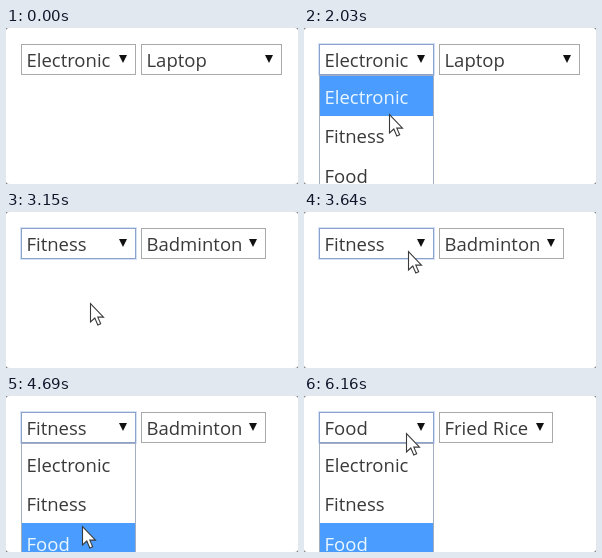
Write an HTML page with a canvas that moves like this. It is 292 by 156 pixels and loops after 6300 ms.

```html
<!DOCTYPE html>
<html lang="en">
<head>
<meta charset="utf-8">
<title>Linked dropdowns</title>
<style>
  html, body { margin: 0; width: 100%; height: 100%; overflow: hidden; background: #fff; }
  canvas { display: block; width: 292px; height: 156px; }
</style>
</head>
<body>
<canvas id="stage"></canvas>
<script>
const W = 292, H = 156, LOOP = 6300, TICK = 70;
const BOX_TOP = 16, BOX_HEIGHT = 31, BOX_WIDTH = 115, LIST_TOP = 48, ROW = 39.5;
const TEXT = '#3a3a3a', BORDER = '#a9a9a9', BLUE = '#4a9dff';

const choices = [
  { category: 'Electronic', product: 'Laptop', width: 141 },
  { category: 'Fitness', product: 'Badminton', width: 125 },
  { category: 'Food', product: 'Fried Rice', width: 114 }
];

const linear = k => k;
const easeOut = k => 1 - (1 - k) ** 2;
const easeInOut = k => k * k * (3 - 2 * k);

const entry = { x: 162, y: 140 };
const moves = [
  { from: 70, to: 210, x: 102, y: 36, ease: linear },
  { from: 1540, to: 2240, x: 78, y: 107, ease: linear },
  { from: 3080, to: 3640, x: 104, y: 39, ease: easeOut },
  { from: 4200, to: 4690, x: 76, y: 130, ease: easeInOut },
  { from: 5460, to: 5950, x: 102, y: 37, ease: easeInOut }
];
const opens = [1400, 3920, 6020];
const closes = [2660, 5040];

const canvas = document.getElementById('stage');
const ctx = canvas.getContext('2d');
const scale = window.devicePixelRatio || 1;
canvas.width = W * scale;
canvas.height = H * scale;

function pointerAt(t) {
  let { x, y } = entry;
  for (const move of moves) {
    const k = Math.min(Math.max((t - move.from) / (move.to - move.from), 0), 1);
    x += (move.x - x) * move.ease(k);
    y += (move.y - y) * move.ease(k);
  }
  return { x: Math.round(x), y: Math.round(y) };
}

// The list fades for one tick when it opens and when it closes.
function listOpacity(t) {
  const i = opens.findLastIndex(time => t >= time);
  const close = closes[i] ?? LOOP;
  if (i < 0 || t >= close + TICK) return 0;
  return t < opens[i] + TICK || t >= close ? 0.5 : 1;
}

function rect(x, y, w, h, color) {
  ctx.fillStyle = color;
  ctx.fillRect(x, y, w, h);
}

function outline(x, y, w, h, color) {
  ctx.strokeStyle = color;
  ctx.lineWidth = 1;
  ctx.strokeRect(x + 0.5, y + 0.5, w - 1, h - 1);
}

function label(text, x, baseline, color = TEXT) {
  ctx.fillStyle = color;
  ctx.fillText(text, x, baseline);
}

function polygon(points) {
  ctx.beginPath();
  points.forEach(([x, y]) => ctx.lineTo(x, y));
  ctx.closePath();
}

function drawSelect(x, width, text, focused) {
  if (focused) outline(x - 1, BOX_TOP - 1, width + 2, BOX_HEIGHT + 2, '#d5e1f5');
  outline(x, BOX_TOP, width, BOX_HEIGHT, focused ? '#8ba2cc' : BORDER);
  label(text, x + 5.5, 39);
  const middle = x + width - 13;
  polygon([[middle - 4, 27], [middle + 4, 27], [middle, 35]]);
  ctx.fillStyle = '#111';
  ctx.fill();
}

function drawList(active, opacity) {
  ctx.globalAlpha = opacity;
  rect(15, 47, BOX_WIDTH, H, '#fff');
  outline(15, 47, BOX_WIDTH, H, '#a3afc0');
  choices.forEach(({ category }, i) => {
    const top = LIST_TOP + i * ROW;
    if (i === active) rect(16, Math.round(top), BOX_WIDTH - 2, Math.round(ROW), BLUE);
    label(category, 20.5, Math.floor(top) + 28, i === active ? '#eaf6ff' : TEXT);
  });
  ctx.globalAlpha = 1;
}

function drawPointer({ x, y }) {
  ctx.save();
  ctx.translate(x + 0.5, y + 0.5);
  polygon([[0, 0], [0, 18.5], [4.3, 14.5], [7.3, 21.5], [10.2, 20.2], [7.3, 13.6], [13, 13.6]]);
  ctx.fillStyle = '#fff';
  ctx.fill();
  ctx.strokeStyle = '#3a3a3a';
  ctx.lineWidth = 1.1;
  ctx.stroke();
  ctx.restore();
}

function draw(t) {
  const pointer = pointerAt(t);
  const opacity = listOpacity(t);
  const selected = closes.filter(time => t >= time + TICK).length;
  const { category, product, width } = choices[selected];

  ctx.setTransform(scale, 0, 0, scale, 0, 0);
  ctx.font = '18.5px "Open Sans", "Noto Sans", sans-serif';
  rect(0, 0, W, H, '#777');
  ctx.beginPath();
  ctx.roundRect(0, 0, W, H, 3);
  ctx.fillStyle = '#fff';
  ctx.fill();

  drawSelect(15, BOX_WIDTH, category, t >= opens[0] - TICK);
  drawSelect(135, width, product, false);

  if (opacity) {
    const hovered = Math.floor((pointer.y - LIST_TOP) / ROW);
    drawList(hovered >= 0 ? hovered : selected, opacity);
  }
  if (t >= moves[0].from) drawPointer(pointer);
}

const start = performance.now();
function frame() {
  const t = (performance.now() - start) % LOOP;
  draw(Math.floor(t / TICK) * TICK);
  requestAnimationFrame(frame);
}
frame();
</script>
</body>
</html>
```
